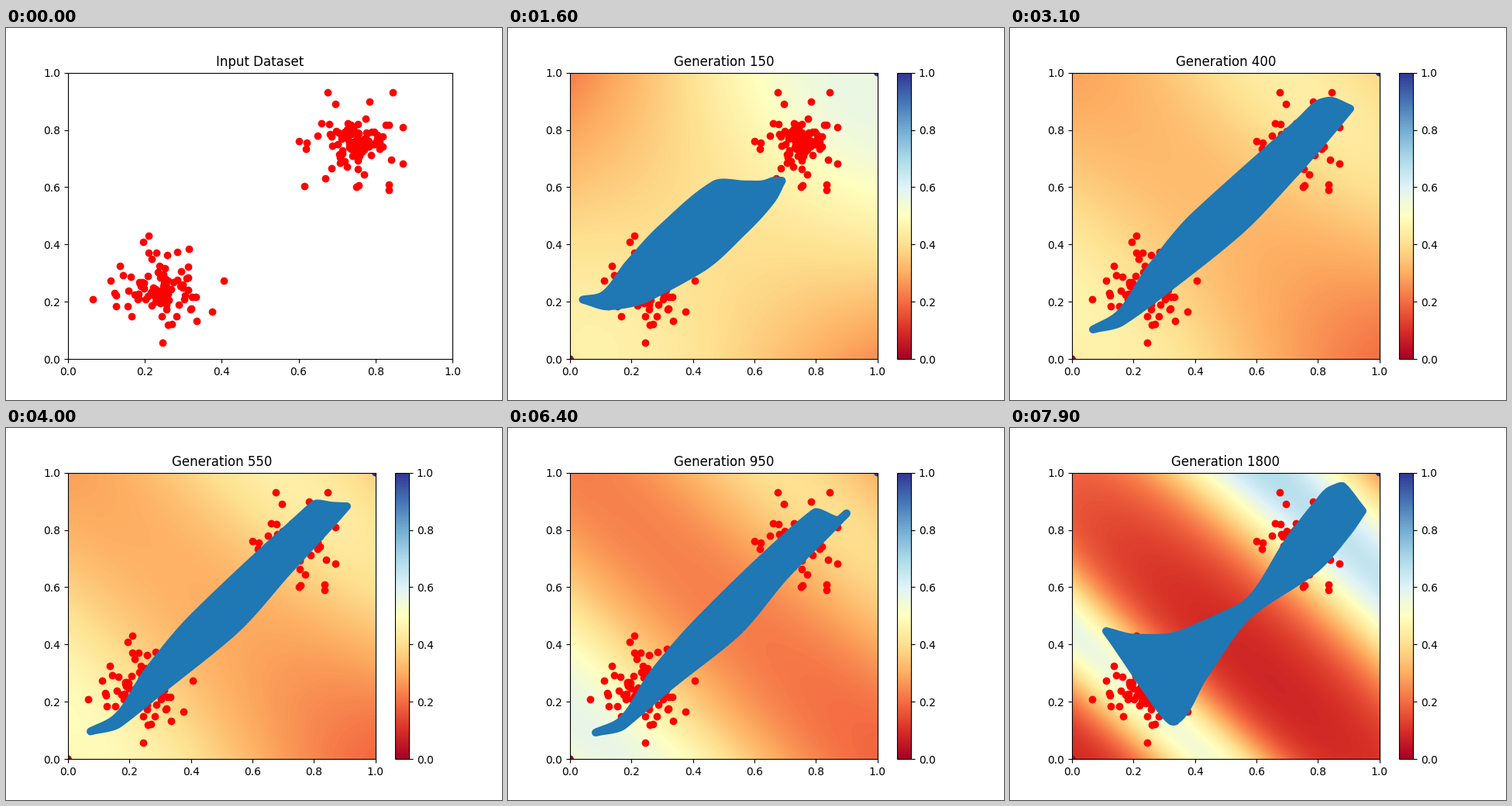
Write a matplotlib script that moves like this. It is 640 px wide and 480 px high and loops after 8000 ms.

```python
import numpy as np
import matplotlib.pyplot as plt
from matplotlib.animation import FuncAnimation

LEFT, BASE, WIDTH, HEIGHT = 80, 427.2, 396.8, 369.6   # plot box in pixels
DOT = 10                                              # dot diameter in pixels
rng = np.random.default_rng(7)

# Stations from tail to head where the blob's sides are given.
UPPER = np.array([0, .08, .25, .45, .74, .86, .93, .97, 1])
LOWER = np.array([0, .08, .25, .5, .75, .92, 1])


def smooth(knots, vals, u):
    """Cubic curve through the values that never overshoots them."""
    d = np.diff(vals) / np.diff(knots)
    a, b = d[:-1], d[1:]
    same = a * b > 0
    inner = np.where(same, 2 * a * b / np.where(same, a + b, 1), 0)
    slope = np.r_[d[0], inner, d[-1]]
    i = np.clip(np.searchsorted(knots, u, side="right") - 1, 0, len(d) - 1)
    h = knots[i + 1] - knots[i]
    t = (u - knots[i]) / h
    return ((1 + 2 * t) * (1 - t) ** 2 * vals[i]
            + t * (1 - t) ** 2 * h * slope[i]
            + t ** 2 * (3 - 2 * t) * vals[i + 1]
            + t ** 2 * (t - 1) * h * slope[i + 1])


def outline(tail, head, up, low):
    """Polygon around the line tail-head, sides measured square to it."""
    u = np.linspace(0, 1, 150)
    axis = head - tail
    normal = np.array([axis[1], -axis[0]]) / np.hypot(*axis)

    def side(knots, offsets):
        off = smooth(knots, np.r_[0, offsets, 0], u)
        return tail + np.outer(u, axis) + np.outer(off, normal)

    x, y = np.vstack([side(UPPER, up), side(LOWER, -low)[::-1]]).T
    return np.column_stack([(x - LEFT) / WIDTH, (BASE - y) / HEIGHT])


def surface(valley, low, high):
    """Valley along the falling diagonal with a ridge on either side."""
    x, y = np.meshgrid(np.linspace(0, 1, 120), np.linspace(1, 0, 120))
    across, along = x + y - 1, x - y
    start, mid, end = valley
    f = mid + (end - start) / 2 * along + ((start + end) / 2 - mid) * along ** 2
    for (h, centre, w), sign in ((low, -1), (high, 1)):
        f += h * np.exp(-((across - sign * centre) / w) ** 2)
    return f


# tail, head | upper side | lower side | valley, low ridge, high ridge
PRONGED = np.r_[-10, 9, 21, 28, 29, 28, 0, 17, 18, 23, 8, 3]
KEYS = {
    50: np.r_[96, 299, 269, 322, -13, 13, 35, 63, 22, 1, 0,
              32, 52, 51, 38, 18,
              .21, .43, .27, .04, 1, .5, .25, 1, .7],
    250: np.r_[97, 402, 438, 72, -4, 6, 19, 18, 17, 15, 11,
               17, 30, 37, 22, 11,
               .21, .35, .20, .09, .75, .45, .10, .75, .45],
    400: np.r_[107, 389, 439, 104, -7, 12, 26, 29, 30, 32, 25,
               17, 23, 27, 17, 6,
               .27, .31, .19, .15, .85, .5, .13, .7, .4],
    700: np.r_[111, 394, 441, 98, PRONGED,
               .26, .26, .16, .26, .9, .5, .18, .7, .4],
    950: np.r_[113, 393, 437, 110, PRONGED,
               .20, .20, .16, .37, .85, .5, .20, .7, .4],
    1800: np.r_[124, 262, 455, 107, -23, -45, -46, 10, 32, 42, 41,
                143, 105, 57, 43, 17,
                .17, .08, .09, .46, .56, .22, .58, .65, .34],
}
PARTS = np.cumsum([2, 2, 7, 5, 3, 3])


def state(gen):
    """Field and outline, all parameters eased linearly between keys."""
    rows = np.array(list(KEYS.values())).T
    row = [np.interp(gen, list(KEYS), r) for r in rows]
    parts = np.split(np.array(row), PARTS)
    return surface(*parts[4:]), outline(*parts[:4])


def cluster(centre, spread, strays):
    core = rng.normal(centre, spread, (100 - len(strays), 2))
    return np.vstack([core, strays])


data = np.vstack([
    cluster(.25, .05, [
        (.065, .21), (.11, .273), (.135, .325), (.12, .23), (.125, .185),
        (.195, .41), (.21, .43), (.21, .37), (.23, .37), (.285, .375),
        (.315, .385), (.405, .275), (.375, .165), (.335, .133), (.27, .122),
        (.26, .12), (.245, .057)]),
    cluster(.755, .042, [
        (.675, .93), (.695, .89), (.66, .823), (.65, .78), (.6, .76),
        (.62, .755), (.615, .603), (.67, .63), (.75, .6), (.757, .607),
        (.835, .59), (.835, .61), (.87, .683), (.87, .81), (.845, .93),
        (.785, .9)]),
])

fig = plt.figure(figsize=(6.4, 4.8), dpi=100)
intro, ax = fig.add_subplot(111), fig.add_subplot(111)
field, shape = state(50)
image = ax.imshow(field, cmap="RdYlBu", vmin=0, vmax=1, aspect="auto",
                  extent=(0, 1, 0, 1), interpolation="bilinear", zorder=0)
bar = fig.colorbar(image, ax=ax)
ax.scatter([0, 1], [0, 1], c=[0, 1], cmap="RdYlBu", zorder=1)
blob, = ax.fill(*shape.T, color="tab:blue", lw=DOT * 72 / fig.dpi,
                joinstyle="round", zorder=2)
ticks = np.linspace(0, 1, 6)
for a in (intro, ax):
    a.scatter(*data.T, color="red", zorder=1)
    a.set(xlim=(0, 1), ylim=(0, 1), xticks=ticks, yticks=ticks)
intro.set_title("Input Dataset")


def draw(n):
    training = n >= 10
    intro.set_visible(not training)
    ax.set_visible(training)
    bar.ax.set_visible(training)
    if training:
        step = (n - 10) // 3 + 1
        gen = 50 * step if step <= 20 else 1000 + 200 * (step - 20)
        field, shape = state(gen)
        image.set_data(field)
        blob.set_xy(shape)
        ax.set_title(f"Generation {gen}")
    return []


anim = FuncAnimation(fig, draw, frames=80, interval=100, repeat=True,
                     repeat_delay=0, blit=False)
plt.show()
```
